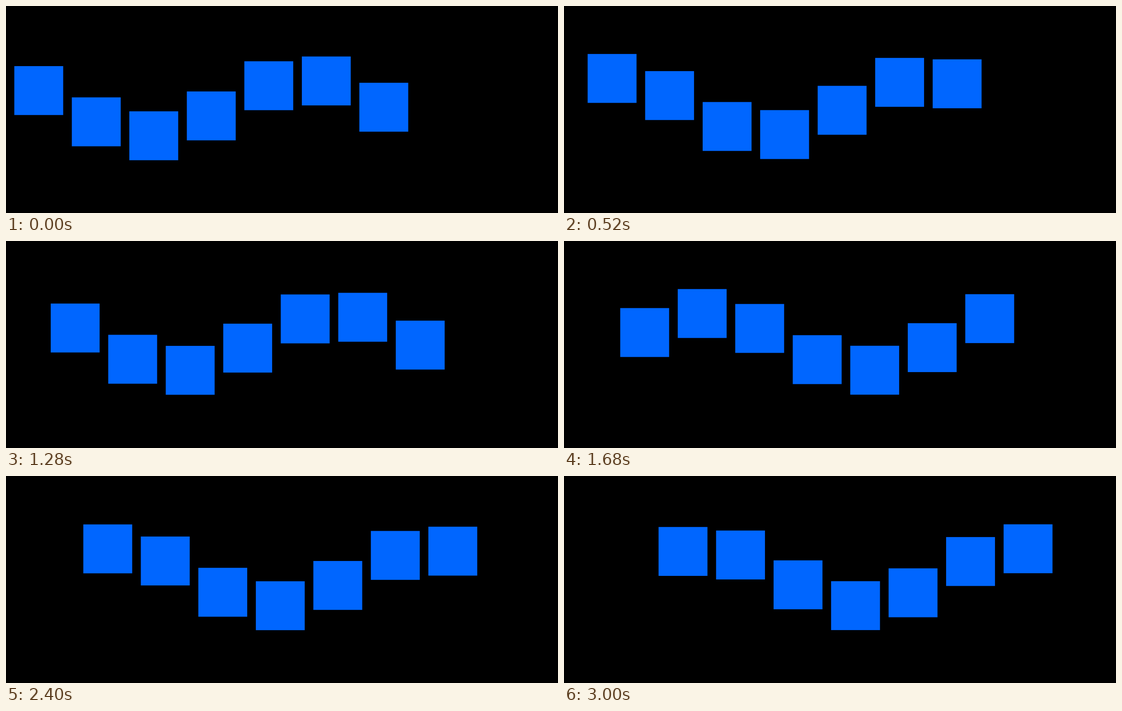
Write an HTML page with a canvas that moves like this. It is 1222x458 px and loops after 3.04 s.

```html
<!DOCTYPE html>
<html lang="en">
<head>
<meta charset="utf-8">
<title>Square wave</title>
<style>
html, body { margin: 0; width: 100%; height: 100%; overflow: hidden; background: #000; }
canvas { display: block; }
</style>
</head>
<body>
<canvas id="stage" width="1222" height="458"></canvas>
<script>
const ctx = document.getElementById('stage').getContext('2d');
const LOOP = 3040, HOLD = 40, FPS = 30;
const COUNT = 7, UNIT = 2.1218;
const SIZE = 51 * UNIT, GAP = 60 * UNIT, AMP = 30 * UNIT, SPEED = 30 * UNIT;
const LEFT = 18.4, MID = 169.8;

// Motion is sampled at 30 fps and shown in 40 ms steps.
function sampleTime(ms) {
  const shown = Math.floor((ms % LOOP) / HOLD) * HOLD;
  return Math.round(shown * FPS / 1000) / FPS;
}

function draw(t) {
  ctx.fillStyle = '#000';
  ctx.fillRect(0, 0, 1222, 458);
  ctx.fillStyle = '#0066ff';
  for (let i = 0; i < COUNT; i++) {
    const x = LEFT + i * GAP + SPEED * t;
    const y = MID + AMP * Math.sin(10 * t + 1.15 * i - 0.616);
    ctx.fillRect(x, y, SIZE, SIZE);
  }
}

let start = null;
function tick(now) {
  if (start === null) start = now;
  draw(sampleTime(Math.max(0, now - start)));
  requestAnimationFrame(tick);
}

draw(0);
requestAnimationFrame(tick);
</script>
</body>
</html>
```
